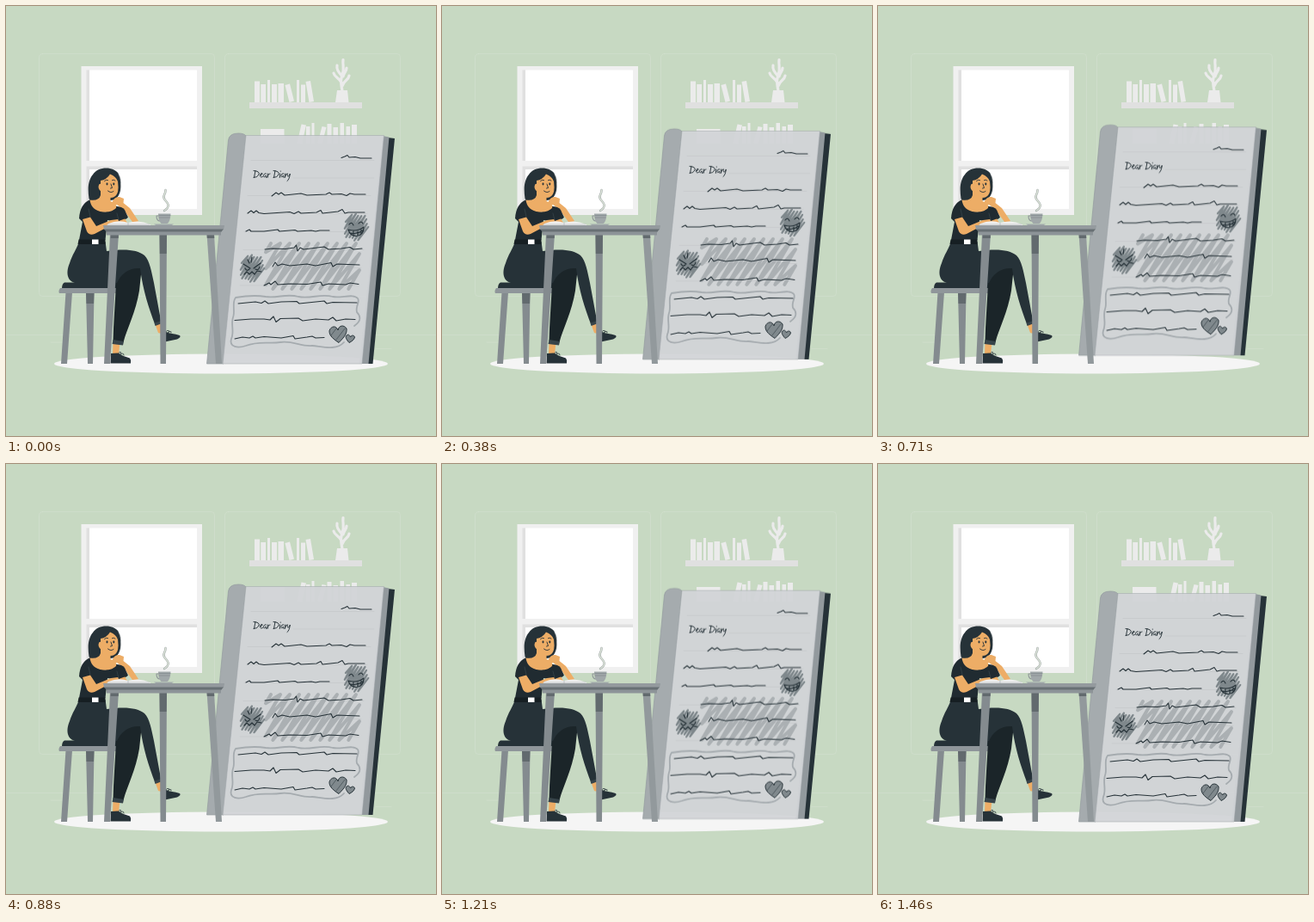
Animation, 500 px wide and 500 px high, one loop 1500 ms. Source, as an HTML page:

```html
<!DOCTYPE html>
<html lang="en">
<head>
<meta charset="utf-8">
<title>Dear Diary</title>
<style>
  html, body { margin: 0; height: 100%; overflow: hidden; background: #c7d9c2; }
  svg { display: block; width: 100%; height: 100%; }
  .line { fill: none; stroke-linecap: round; stroke-linejoin: round; }
  .ink { stroke: #263238; }
  .skin { fill: #edad66; }
  .dark { fill: #263238; }
  .wood { fill: #848b8f; }
  .shade { fill: #626a6e; }
  .pale { fill: #ebebeb; }

  /* 24 poses per second: 18 going up, 18 coming down */
  #diary { animation: float 1.5s -5ms infinite; }
  @keyframes float {
    0% { transform: translateY(0); animation-timing-function: steps(18, jump-none); }
    50% { transform: translateY(-9.71px); animation-timing-function: steps(18, jump-none); }
    100% { transform: translateY(0); }
  }
</style>
</head>
<body>
<svg viewBox="0 0 500 500">
  <rect width="500" height="500" fill="#c7d9c2"/>

  <g id="room">
    <g class="line" stroke="#d1dfcd" stroke-width=".8">
      <rect x="38.5" y="55.5" width="204" height="282" rx="4"/>
      <rect x="254.5" y="55.5" width="204" height="282" rx="4"/>
      <path d="M0 382.5H500M430 398.5H448M52 391H70"/>
    </g>
    <path fill="#f0f0f0" d="M87.500 70H228V243H87.500Z"/>
    <path fill="#e0e0e0" d="M93.500 74.500H97V180H93.500ZM93.500 186.500H222V190H97V236H93.500Z"/>
    <path fill="#fff" d="M97 74.500H222V180H97ZM97 190H222V236H97Z"/>

    <path fill="#e0e0e0" d="M283 112H414V119H283Z"/>
    <path class="pale" d="M289 87.500h6v24.500h-6zM296.300 91h5.700v21h-5.700zM304 86h3v26h-3zM309 91h6v21h-6zM316.500 90h6.500v22h-6.500zM324.500 92l5.500-1.500 5 20-5.500 1.500zM338 86h3v26h-3zM343 91.500h5v20.500h-5zM348.500 88l5.500-1 4 24-5.500 1z"/>
    <path class="pale" d="M385 98H397L398.500 112H383Z"/>
    <path class="line" stroke="#ebebeb" stroke-width="3.200" d="M391 99C390 91 388 88 391 80C394 72 391 69 392 62.500M390 89C387 83 382 83 381 78M391 82C387 77 384 74 385 69M391 93C393 86 398 87 399 81M392 82C393 77 396 76 396 72"/>
    <path class="pale" d="M296 143h27.500v17h-27.500zM343.500 137.500l5.500 1-5 22-5.500-1zM349 140h4.500v20h-4.500zM355.500 136h3v24h-3zM367.500 140l5 1-5 19-5-1zM373.500 137h5v23h-5zM380.500 141h5.500v19h-5.500zM388.500 136h4.500v24h-4.500zM395.500 140h4.500v20h-4.500zM402 138h6v22h-6z"/>
    <ellipse cx="250" cy="416" rx="194" ry="11.500" fill="#f5f5f5"/>
  </g>

  <g id="diary">
    <path class="dark" d="M440 152.500L452 154 426.500 416H415Z"/>
    <path fill="#92999d" d="M438 151L445.500 152.500 421.500 416H411Z"/>
    <path fill="#a5abae" stroke="#949b9f" stroke-width=".7" d="M233.500 416L258.500 156Q259.500 148 270 148Q277 148 279 151L253 416Z"/>
    <path fill="#d2d4d7" fill-opacity=".95" stroke="#9da3a6" stroke-width=".5" d="M279 150.500H439.500L414 416H252Z"/>
    <path class="line" stroke="#c4c8cb" stroke-width=".7" d="M285 179.500H428M334 200H428M281 220.500H424M280 241.500H420M277 262.500H418M276 283.500H416M274 304.500H413M272 325H411"/>

    <path id="hatch" class="line" stroke="#abb0b3" stroke-width="4"/>
    <path class="line" stroke="#a5abaf" stroke-width="1.800" d="M405 372C414 366 412 360 408 356C406 349 412 344 409 340C404 334 390 340 380 338C366 334 354 341 340 338C326 334 316 340 302 338C290 336 279 337 267 339C262 346 267 354 264 362C261 371 266 378 262 387C259 397 270 398 279 395C294 389 305 393 319 391C334 389 342 396 356 395C368 396 384 401 393 391"/>

    <g class="line ink" stroke-width="1.100">
      <path d="M390 176.500L394 175 397 173.500 399 176 406 175.500 412 177 425 177"/>
      <path d="M309 221L314 217 317 219 320 217 324 220 343 218 350 220 372 219 376 217 379 219 390 218.500 396 220.500 400 218 405 219 418 219"/>
      <path d="M281 241L285 238 288 240.500 291 238 294 240.500 300 241.500 330 239.500 335 241.500 340 239 343 241 361 240 366 237.500 368 241 386 239 391 236.500 394 241 398 240 417 240"/>
      <path d="M279 262L283 260 285 262 300 262 316 260 318 262 336 260.500 339 262 355 261 360 262 365 261 376 261"/>
      <path d="M301 283L310 282 325 282.500 335 281 337.500 278 339 285 342 281 346 283 370 280 375 283 390 282 400 280.500 404 283 414 282"/>
      <path d="M310 303L313 298 316 302 321 300 330 302 350 300 360 302 378 298.500 380 303 385 300 411 301"/>
      <path d="M300 325L306 322 308 324 313 320 316 324 330 323 350 323.500 366 321 368 325 375 323 395 324 400 322 410 323.500"/>
      <path d="M270 346L280 345 290 344 297 345.500 301 343 305 346 320 344 338 343.500 341 346 370 343 373 346 380 344.500 408 345"/>
      <path d="M266 365.500L285 364 300 364 307 365 311 361 314 367.500 319 363.500 340 363 345 366 360 364 375 365 380 362 384 366 395 364 406 364.500"/>
      <path d="M266 387L275 385 283 386 287 384 290 386 300 384.500 320 386 334 383.500 336 387 350 385 356 384 360 386 370 385.500"/>
    </g>

    <path role="img" aria-label="Dear Diary" class="line ink" stroke-width=".95" d="M290 191.500L288.500 199.500M288 191.500Q295.500 192 294 196Q292.500 199.500 288 199.500M295.500 197Q299 196 298 194.500Q295.500 194 295.500 198Q296.500 200 298.500 198.500M302.500 195Q300 194 299.500 197.500Q300 200.500 302 197L302.500 199.500M304.500 195L304 199.500Q304.500 195 307 195M313 191.500L311.500 199.500M311 191.500Q318.500 192 317 196Q315.500 199.500 311 199.500M318.800 195L318.300 199.500M319.300 192V192.300M323 195Q320.500 194 320 197.500Q320.500 200.500 322.500 197L323 199.500M324.800 195L324.300 199.500Q324.800 195 326.800 195M327.200 195Q326.500 199.500 329.300 197.500L330.300 195Q329.500 202 327 203.500"/>

    <path class="line ball" data-at="286 305" stroke="#7f888c" stroke-width="2.200"/>
    <path class="line ink" stroke-width="1.200" d="M276 300L284 305M296 299L288 305M278 305Q280 309 283 306M290 306Q294 308 295 303M277 312L280 309 283 312 286 309 289 312 292 308 297 309M281 295L283 299M286 292L285 298"/>
    <path class="line ball" data-at="407 257" stroke="#7f888c" stroke-width="2.200"/>
    <path class="line ink" stroke-width="1.100" d="M399 254Q402 250 404 255M410 253Q413 249 415 253M398 260Q408 263 416 257Q416 267 407 267.500Q400 267 398 260ZM401 264Q408 266 415 261M404 262V266M409 262V267M413 260V265"/>

    <g class="ink" fill="#80898d" stroke-width="1" stroke-linejoin="round">
      <path d="M387 391.500C382 388 375.500 384 376 377.500C378 372 384 371 386 377C387 371 393 370.500 396 375C397 382 391 387 387 391.500Z"/>
      <path d="M399 391.500C396 388 394 385 396 383C398 381 400 383 400.500 385C402 382 405 383 405.500 385C405 388 402 390 399 391.500Z"/>
    </g>
    <path class="line ink" stroke-width=".5" d="M378 383L384 375M384 388L394 375"/>
  </g>

  <g id="stool">
    <path class="wood" d="M69.500 333H77L71 416H64ZM93 333H102.500L101 416H95Z"/>
    <path class="shade" d="M93 333H102.500L102 346H93.500Z"/>
    <path class="dark" d="M68 321.500H131.500V328.500H65Q65 323 68 321.500Z"/>
    <path fill="#8f969a" d="M63 328H131V334H62Q60.500 331 63 328Z"/>
  </g>

  <g id="woman">
    <path class="skin" d="M124.500 391H132.500L131 405H124ZM173 369L180 367.500 181 381 177 380Z"/>
    <path fill="#1b2529" d="M128 322C132 304 146 298 158 303L155 331C151 356 141 374 136.500 391L124.500 389.500C125 368 127 344 128 322Z"/>
    <path class="dark" d="M85 274H115.500L117 285C137 282 153 283 161 290C167 296 169 308 172 322L180.500 368 173.500 371C166 351 159 330 156 305C143 304 134 311 129 322H80C70 319 70 308 74 299C77 289 82 283 85 274Z"/>
    <path fill="#37444a" d="M124.500 388L137 390 136 394.500 123.500 393ZM172.500 368.500L180.500 366 181.500 369 173.500 372Z"/>
    <path class="dark" d="M122 404L130 403.500C134 406 139 408 144 409.500Q146 412 145 415.500H121.500ZM180 377.500L186 379C190 381 196 381 202 383Q204 385 199 387.500L187 390 181.500 391.500Z"/>
    <path class="line ink" stroke-width=".8" d="M131 405Q131 401 134 403L132 406Q137 402 137 406M186 380Q186 376 190 378L187 381Q193 376 192 380"/>

    <path class="dark" d="M96.500 224C95 214 95 203 101 196C105 189.500 114 187.500 121 189C130 190.500 134.500 198 133.500 207C134 214 132 221 127 225L108 229Q100 230 96.500 224Z"/>
    <path class="line" stroke="#f5f5f5" stroke-width=".7" d="M131 195Q135.500 204 133.500 217"/>

    <path fill="#202b31" d="M98 225Q101 238 113 239Q124 240 128 233Q137 236 141 247L131 251 118 249 115.500 272H85L89 251 85 247Q86 230 98 225Z"/>
    <path class="skin" d="M110 212L121.500 220V227Q128 229 129 234Q124 240 113 239.500Q99 238 97.500 225.500Q108 227 110 220Z"/>
    <path class="skin" d="M110 203Q117 202 121 195.500Q128 198 130 204Q131 211 130 216Q128 223 122 223Q115 222 111.500 216Q107.500 214 107.500 210Q108 206 110 207Z"/>
    <path class="line ink" stroke-width=".9" d="M114.500 203.500Q116 201.500 118.500 202.500M123.500 202.500Q125.500 201.500 127 203M118.500 215Q122 218 125 215.500M122 207L123.500 211.500 121.500 212"/>
    <ellipse class="dark" cx="117.500" cy="207" rx="1" ry="1.400"/>
    <ellipse class="dark" cx="125.300" cy="207" rx="1" ry="1.400"/>

    <path class="skin" d="M89 248L98 245.500 105 256 122 249 138 247 141 252 120 256 103 265Q97 267.500 94 262Z"/>
    <path class="skin" d="M123 229Q126 221 132 222L137 224 136.500 229 144 235 154 250Q152 252 147 251L136 236 129 231 126 232Z"/>
    <path fill="#202b31" d="M128 233Q135 233 138 237L142 246 131 250Z"/>
    <path class="line" stroke="#37444a" stroke-width=".8" d="M96 236L98 245M129 241L131 249"/>
    <path fill="#161f23" d="M84.500 271.500H115.500V277H83.500Z"/>
    <path fill="#fff" d="M100 271.500H107.500V277H100Z"/>
  </g>

  <g id="table">
    <path fill="#f0f0f0" d="M119 253Q131 248 142 252Q155 248 168 254V255.500H117Z"/>
    <path class="line" stroke="#a7adb0" stroke-width=".6" d="M118 254H167M142 252V255"/>
    <path class="line" stroke="#9da5a4" stroke-width="2.400" d="M184 238C192 233 188 229 184.500 225C181 221 186 219 185.500 214"/>
    <path class="line" stroke="#dde5da" stroke-width="1.300" d="M184 238C192 233 188 229 184.500 225C181 221 186 219 185.500 214"/>
    <path class="line" stroke="#8f9699" stroke-width="1.100" d="M178 244H175Q175 250 179 250"/>
    <path fill="#a0a7a9" d="M177 241.500H191.500Q191 251 187.500 253H180.500Q177 250 177 241.500ZM172 253.500H195L192 255.500H175Z"/>
    <path class="line" stroke="#7d8588" stroke-width=".6" d="M178 243.500H191M178 246H190"/>
    <path class="wood" d="M121 265H131L121 416H114ZM178.500 265H187L186 416H179.500Z"/>
    <path fill="#92999c" d="M233.500 265H242L251 416H244Z"/>
    <path class="shade" d="M178.500 265H187L186.700 288H178.800ZM122 265H131L130.700 270H121.600ZM233.500 265H242L242.300 270H233.800Z"/>
    <path fill="#949a9e" d="M113 255H254L253 260H114Z"/>
    <path fill="#687074" d="M114 259.500H253L250 263H117Z"/>
    <path fill="#8d9498" d="M117 262.500H250V266.500H117Z"/>
  </g>
</svg>
<script>
  const draw = (el, pts) => el.setAttribute('d', 'M' + pts.map(p => p.map(v => v.toFixed(1)).join(' ')).join('L'));

  // Slanted pen strokes kept inside a box
  function hatch(el, x0, y0, x1, y1) {
    const slant = 0.58, pts = [];
    for (let x = x0 + 6; x < x1 + slant * (y1 - y0) - 6; x += 11) {
      const top = Math.max(y0, y0 + (x - x1) / slant);
      const end = Math.min(y1, y0 + (x - x0) / slant);
      for (const y of [top, end]) pts.push([x - slant * (y - y0), y]);
    }
    draw(el, pts);
  }

  // Round zigzag scribble
  function ball(el, r) {
    const [cx, cy] = el.dataset.at.split(' ').map(Number), pts = [];
    for (let d = -r, i = 0; d <= r; d += 1.7, i++) {
      const h = (Math.sqrt(r * r - d * d) + 1.5 + 1.8 * Math.sin(i * 2.3)) * (i % 2 ? 1 : -1);
      pts.push([cx + 0.84 * d + 0.54 * h, cy + 0.54 * d - 0.84 * h]);
    }
    draw(el, pts);
  }

  hatch(document.getElementById('hatch'), 302, 276, 411, 329);
  document.querySelectorAll('.ball').forEach(el => ball(el, 13.5));
</script>
</body>
</html>
```
